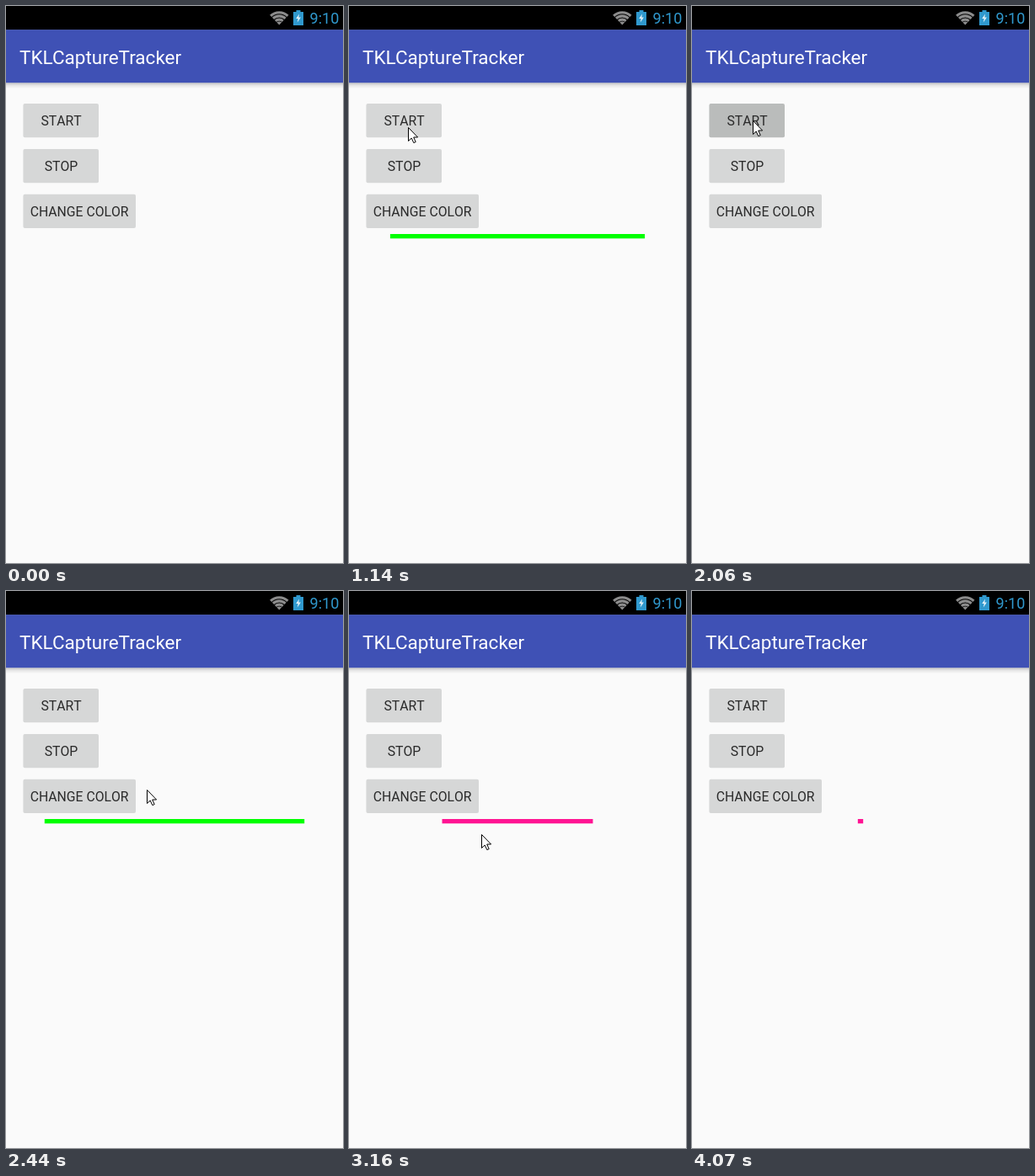
An HTML page that plays this animation: 400x662 px, repeating every 4.76 s.

```html
<!DOCTYPE html>
<html lang="en">
<head>
<meta charset="utf-8">
<title>Record progress</title>
<style>
  html, body { margin: 0; width: 100%; height: 100%; overflow: hidden; background: #fafafa; }
  svg { display: block; width: 100vw; height: 100vh; }
  text { font-family: Roboto, sans-serif; }
  .btn rect { fill: #d6d7d7; }
  .btn.down rect { fill: #babcbb; }
  .btn text { font-size: 15.75px; font-kerning: none; fill: #2b2b2b; text-anchor: middle; }
</style>
</head>
<body>
<svg viewBox="0 0 400 662">
  <defs>
    <linearGradient id="shade" x2="0" y2="1">
      <stop offset="0" stop-color="#000" stop-opacity=".24"/>
      <stop offset=".4" stop-color="#000" stop-opacity=".09"/>
      <stop offset="1" stop-color="#000" stop-opacity="0"/>
    </linearGradient>
    <clipPath id="fan"><path d="M324.3 22.5L311 8.5V4H337.6V8.5Z"/></clipPath>
  </defs>

  <rect width="400" height="662" fill="#fafafa"/>
  <rect y="91.2" width="400" height="7" fill="url(#shade)"/>
  <rect y="28.1" width="400" height="63.1" fill="#3f51b5"/>
  <rect width="400" height="28.1" fill="#000"/>

  <g clip-path="url(#fan)" fill="none" stroke="#8c8c8c" stroke-width="3.1">
    <circle cx="324.3" cy="22.5" r="14.8"/>
    <circle cx="324.3" cy="22.5" r="10.6"/>
    <circle cx="324.3" cy="22.5" r="6.4"/>
    <circle cx="324.3" cy="22.5" r="2" stroke-width="4"/>
  </g>
  <path d="M344.5 5h5v2h3.5v16h-12V7h3.5z" fill="#3099ce"/>
  <path d="M348 9.5l-3.8 5.5h2.5l-.9 4.5 4.1-6h-2.6z" fill="#e4f1f8"/>
  <text x="360.6" y="21" font-size="18" fill="#3099ce">9:10</text>
  <text x="16" y="69" font-size="22.5" fill="#fff">TKLCaptureTracker</text>

  <g class="btn" id="start" transform="translate(20.4 115.9)"><rect width="89.6" height="40.3" rx="2"/><text x="45.1" y="26.4">START</text></g>
  <g class="btn" id="stop" transform="translate(20.4 169.9)"><rect width="89.6" height="40.3" rx="2"/><text x="45.1" y="26.4">STOP</text></g>
  <g class="btn" id="color" transform="translate(20.4 223.8)"><rect width="133.6" height="40.3" rx="2"/><text x="66.8" y="26.4">CHANGE COLOR</text></g>

  <rect id="bar" y="271" height="5.3"/>
  <path id="cursor" d="M.5 .5V16.5L4.2 13L6.8 18.6L9.2 17.6L6.7 12H11.6Z" fill="#fff" stroke="#000"/>
</svg>
<script>
  const LOOP = 4760, LAST = 53;       // the screen rests after the last refresh
  const STEP = 77, SHIFT = 24;        // refresh interval and phase, ms
  const HOLD = 200, LAG = 71;         // press length, delay until it takes effect
  const FULL = 184, RATE = 0.0934;    // bar half width, px lost per ms

  const clicks = [
    { id: 'start', at: 708 },
    { id: 'stop', at: 1550 },
    { id: 'start', at: 2050 },
    { id: 'color', at: 2800 }
  ];

  // Pointer moves between resting points
  const entry = { x: 285, y: 576 };
  const moves = [
    { from: 53, to: 594, x: 68, y: 124 },
    { from: 1000, to: 1367, x: 74, y: 191 },
    { from: 1750, to: 1990, x: 72, y: 136 },
    { from: 2150, to: 2440, x: 167, y: 236 },
    { from: 2450, to: 2680, x: 131, y: 245 },
    { from: 3030, to: 3518, x: 359, y: 627 },
    { from: 3518, to: 3600, x: 361, y: 650 }
  ];

  const el = id => document.getElementById(id);
  const bar = el('bar'), cursor = el('cursor');
  const buttons = document.querySelectorAll('.btn');
  const clamp = v => Math.min(1, Math.max(0, v));
  const smooth = u => u * u * (3 - 2 * u);

  function pointAt(t) {
    let { x, y } = entry;
    for (const m of moves) {
      const p = smooth(clamp((t - m.from) / (m.to - m.from)));
      x += (m.x - x) * p;
      y += (m.y - y) * p;
    }
    return [Math.round(x), Math.round(y)];
  }

  function barAt(t) {
    let half = 0, fill = '#00ff00';
    for (const { id, at } of clicks) {
      const age = t - at - LAG;
      if (age < 0) break;
      if (id === 'start') half = Math.max(0, FULL - RATE * age);
      if (id === 'stop') half = 0;
      if (id === 'color') fill = '#ff1493';
    }
    return { x: 200 - half, width: 2 * half, fill };
  }

  function draw(t) {
    for (const b of buttons) {
      const down = clicks.some(c => c.id === b.id && t >= c.at && t < c.at + HOLD);
      b.classList.toggle('down', down);
    }
    for (const [name, value] of Object.entries(barAt(t))) bar.setAttribute(name, value);

    const visible = t >= moves[0].from && t <= moves.at(-1).to + STEP / 2;
    cursor.style.display = visible ? '' : 'none';
    cursor.setAttribute('transform', `translate(${pointAt(t)})`);
  }

  const origin = performance.now();
  function loop() {
    const t = (performance.now() - origin) % LOOP;
    const n = Math.min(LAST, Math.floor((t + SHIFT) / STEP));
    draw(n * STEP - SHIFT);
    requestAnimationFrame(loop);
  }
  loop();
</script>
</body>
</html>
```
